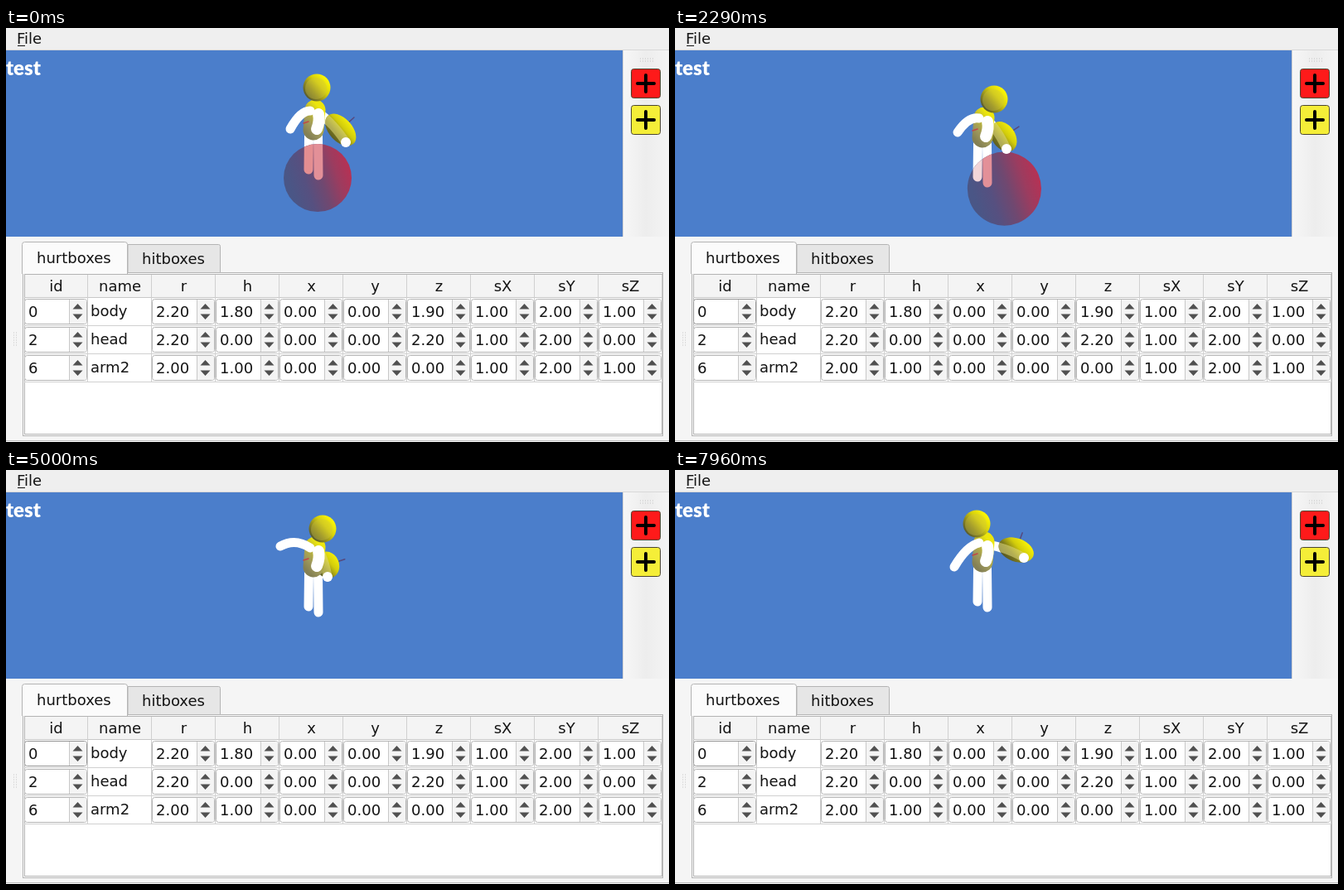
Write an HTML page with a canvas that moves like this. It is 800 by 500 pixels and loops after 8000 ms.

```html
<!DOCTYPE html>
<html lang="en">
<head>
<meta charset="utf-8">
<title>Box editor</title>
<style>
html, body { margin: 0; width: 100%; height: 100%; overflow: hidden; background: #f3f3f3; }
svg, canvas { position: absolute; left: 0; top: 0; }
text { font: 18px "DejaVu Sans", sans-serif; fill: #141414; white-space: pre; }
.mid { text-anchor: middle; }
.label { font: 900 24px Lato, sans-serif; fill: #fff; }
</style>
</head>
<body>
<svg id="ui" width="800" height="500"></svg>
<canvas id="view" width="800" height="500"></canvas>
<script>
const rect = (x, y, w, h, fill, more = '') =>
  `<rect x="${x}" y="${y}" width="${w}" height="${h}" fill="${fill}" ${more}/>`;
const text = (x, y, s, cls = '') => `<text x="${x}" y="${y}" class="${cls}">${s}</text>`;
const path = (d, more) => `<path d="${d}" ${more}/>`;
const edge = 'stroke="#b4b4b4"';

function spinBox(x, y, value, id = '') {
  return rect(x + .5, y + 1.5, 75, 30, '#fff', `rx="3" ${edge} ${id}`) +
    rect(x + 55, y + 2, 20, 29, '#f4f4f4', 'rx="2"') +
    path(`M${x + 54.5} ${y + 2}v29`, 'stroke="#c8c8c8"') +
    path(`M${x + 58.5} ${y + 13.5}l6 -6.5l6 6.5zm0 6l6 6.5l6 -6.5z`, 'fill="#505050"') +
    text(x + 5, y + 23, value);
}

function plusButton(y, fill) {
  return rect(754.5, y + .5, 35, 35, fill, 'rx="3" stroke="#4a4530"') +
    path(`M762 ${y + 18}h20M772 ${y + 8}v20`, 'stroke="#000" stroke-width="4" stroke-linecap="round"');
}

function dots(x, y, cols, rows) {
  let d = '';
  for (let i = 0; i < cols * rows; i++) d += `M${x + i % cols * 3} ${y + (i / cols | 0) * 3}h1`;
  return path(d, 'stroke="#c4c4c4"');
}

function buildUI() {
  const heads = ['id', 'name', 'r', 'h', 'x', 'y', 'z', 'sX', 'sY', 'sZ'];
  const rows = [
    '0 body 2.20 1.80 0.00 0.00 1.90 1.00 2.00 1.00',
    '2 head 2.20 0.00 0.00 0.00 2.20 1.00 2.00 0.00',
    '6 arm2 2.00 1.00 0.00 0.00 0.00 1.00 2.00 1.00'];
  let s = `<defs><linearGradient id="bar"><stop stop-color="#f7f7f7"/><stop offset=".5" stop-color="#ededed"/>
    <stop offset="1" stop-color="#f4f4f4"/></linearGradient></defs>` +
    rect(0, 0, 800, 500, '#f5f5f5') + rect(0, 0, 800, 26, '#efefef') + rect(0, 26, 800, 1, '#d8d8d8') +
    text(13, 19, 'File') + rect(14, 21, 9, 1, '#141414') +
    rect(0, 27, 744, 225, '#4b7ecb') + rect(744, 27, 56, 225, 'url(#bar)') + rect(744, 27, 1, 225, '#cfcfcf') +
    text(0, 57, 'test', 'label') +
    dots(765, 37, 6, 2) + dots(9, 368, 2, 6) +
    plusButton(49, '#fe1a1a') + plusButton(93, '#f5ee38') +
    rect(20.5, 295.5, 772, 197, '#fbfbfb', edge) + rect(22.5, 297.5, 769, 193, '#fff', edge) +
    path('M147 295.5V261.5H256.5q2 0 2 2V295.5z', `fill="#e6e6e6" ${edge}`) +
    path('M19.5 297V261.5q0 -3 3 -3H143.5q3 0 3 3V297', `fill="#fbfbfb" ${edge}`) +
    text(37, 284, 'hurtboxes') + text(164, 285, 'hitboxes') +
    rect(23, 298, 768, 28, '#f4f4f4') + rect(0, 498, 800, 1, '#bdbdbd') +
    rect(22, 325, 770, 1, '#c8c8c8');
  heads.forEach((h, i) => {
    const x = 22 + 77 * i;
    s += text(x + 38.5, 318, h, 'mid') + rect(x + 76, 298, 1, 130, '#d0d0d0');
  });
  rows.forEach((row, j) => {
    const y = 326 + 34 * j;
    s += rect(22, y + 33, 770, 1, '#d0d0d0');
    row.split(' ').forEach((v, i) => {
      const x = 22 + 77 * i;
      s += i === 1 ? text(x + 3, y + 22, v) : spinBox(x, y, v, i + j ? '' : 'id="focus"');
    });
  });
  document.getElementById('ui').innerHTML = s;
}
buildUI();

// A pose is head x, y; hip height; left hand x, y; right hand x, y; how far the body is tucked.
const stand = [375, 72, 123, 343, 122, 410, 138, 0];
const crouch = [385, 86, 132, 341, 126, 400, 146, 0];
const rise = [373, 65, 115, 332, 101, 400, 131, 0];
const tuck = [366, 81, 123, 362, 131, 401, 116, 1];
const reach = [382, 71, 117, 331, 92, 388, 129, 0];
const guard = [365, 65, 112, 336, 106, 411, 124, 0];
const jab = [364, 65, 111, 337, 117, 421, 106, 0];

const mix = (a, b, u) => a.map((v, i) => v + (b[i] - v) * u);
const dip = mix(stand, crouch, .45);
const keys = [[0, stand], [750, dip], [880, dip], [1710, crouch], [2500, crouch], [2920, rise],
  [4000, tuck], [5000, reach], [5830, guard], [6270, jab], [6710, guard], [6920, jab], [8000, jab]];

const off = ([x, y], dx, dy) => [x + dx, y + dy];

// Works out all joints from the few values of a pose.
function figure(t) {
  const i = keys.findIndex(k => k[0] > t);
  const [t0, a] = keys[i - 1], [t1, b] = keys[i];
  const [hx, hy, hipY, lx, ly, rx, ry, fold] = mix(a, b, (t - t0) / (t1 - t0));
  const hip = [371, hipY], chest = [373 + 5 * fold, hipY - 21];
  const shoulderL = off(chest, -6, -2), shoulderR = off(chest, 4, 0);
  const handL = [lx, ly], handR = [rx, ry];
  const leg = (side, drop) => {
    const top = off(hip, 5.5 * side, 8), foot = off(hip, 6 * side + (10 - 6 * side) * fold * .4, drop * (1 - .4 * fold));
    return [top, off(mix(top, foot, .5), -14 * fold, 0), foot];
  };
  return {
    fold, hip, chest, shoulderR, handR, head: [hx, hy],
    legL: leg(-1, 48), legR: leg(1, 55),
    armL: [shoulderL, off(mix(shoulderL, handL, .5), 0, -11), handL],
    armR: [shoulderR, off(mix(shoulderR, handR, .5), 2, -4), handR]
  };
}

const ctx = document.getElementById('view').getContext('2d');
const focusBox = document.getElementById('focus');

function limb(color, width, from, bend, to) {
  ctx.strokeStyle = color;
  ctx.lineWidth = width;
  ctx.lineCap = 'round';
  ctx.beginPath();
  ctx.moveTo(...from);
  ctx.quadraticCurveTo(...bend, ...(to || bend));
  ctx.stroke();
}

function shade([x, y], r, ...colors) {
  const g = ctx.createLinearGradient(x + r * .7, y - r * .6, x - r * .8, y + r * .7);
  colors.forEach((c, i) => g.addColorStop(i / (colors.length - 1), c));
  return g;
}

function disc([x, y], r, fill) {
  ctx.beginPath();
  ctx.arc(x, y, r, 0, 7);
  ctx.fillStyle = fill;
  ctx.fill();
}

function drawBall(t, f) {
  const u = Math.min(t / 1710, 1.19), x = 376 + 18 * u, y = 181 + 11 * u, r = 41 + 3 * u;
  const g = ctx.createLinearGradient(x + r, y - r * .3, x - r * .8, y + r * .3);
  ['#b93053', '#9c3c5f', '#704870', '#565080', '#4a5686'].forEach((c, i) => g.addColorStop(i / 4, c));
  ctx.save();
  disc([x, y], r, g);
  ctx.clip();
  limb(`rgb(${228 + 12 * u},${142 + 60 * u},${145 + 60 * u})`, 11, ...f.legL);
  limb('#e39098', 11, ...f.legR);
  ctx.restore();
}

function drawArmBox(f) {
  const [dx, dy] = [f.handR[0] - f.shoulderR[0], f.handR[1] - f.shoulderR[1]];
  const mid = off(f.shoulderR, dx * .72 + 3 - 7 * f.fold, dy * .72 - 5 - 21 * f.fold);
  const len = Math.hypot(dx, dy), long = Math.max(14, len * .47 - 5 * f.fold);
  limb('#55497f', 1.5, mid, off(mid, dy / len * 22, -dx / len * 22));
  ctx.save();
  ctx.beginPath();
  ctx.ellipse(...mid, long, 14, Math.atan2(dy, dx), 0, 7);
  ctx.fillStyle = shade(mid, 16, '#f4ee08', '#d2cc0c', '#7d791c', '#515426');
  ctx.fill();
  ctx.clip();
  limb('rgba(225,218,130,.55)', 11, ...f.armR);
  ctx.restore();
}

function draw(t) {
  const f = figure(t), mid = off(f.chest, -1, 10);
  ctx.clearRect(0, 0, 800, 500);
  limb('#fff', 11, ...f.legL);
  limb('#fff', 11, ...f.legR);
  if (t < 2520) drawBall(t, f);
  limb('#fff', 11, ...f.armR);
  drawArmBox(f);
  disc(f.handR, 6, '#fff');

  limb(shade(mid, 16, '#ece60c', '#bdb736', '#a09a5c', '#848054'), 25 - 6 * f.fold, off(f.chest, 0, -3), off(f.hip, 5 * f.fold, 0));
  limb('#c04848', 1.5, off(mid, -13, 3), off(mid, -7, 1));
  limb('#fff', 11, ...f.armL);
  const front = off(f.shoulderR, -13 * f.fold, 2 + 6 * f.fold);
  limb('#fff', 14, front, off(front, 2, 8), off(front, -2, 18));

  disc(f.head, 16.5, shade(f.head, 17, '#fbf506', '#d8d20c', '#8d8822', '#505430'));
  disc(off(f.head, -1, 1), 13, 'rgba(206,196,70,.35)');
  focusBox.setAttribute('stroke', t < 880 ? '#b4b4b4' : '#949494');
}

function tick(now) {
  draw(now % 8000);
  requestAnimationFrame(tick);
}
requestAnimationFrame(tick);
</script>
</body>
</html>
```
